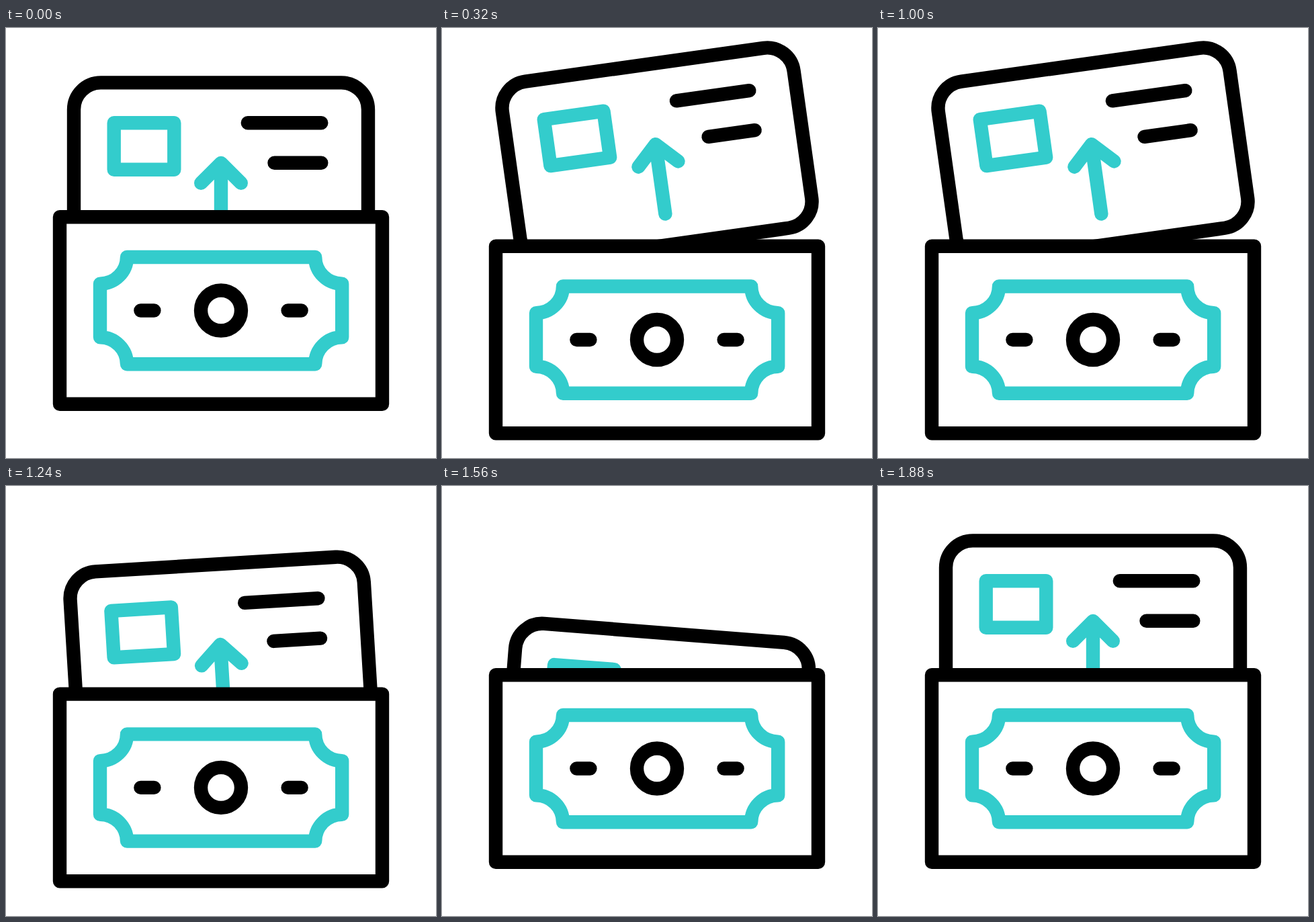
Write an HTML page that moves like this. It is 640x640 px and loops after 2000 ms.

```html
<!DOCTYPE html>
<html lang="en">
<head>
<meta charset="utf-8">
<title>Card and banknote</title>
<style>
  html, body { margin: 0; width: 100%; height: 100%; overflow: hidden; background: #fff; }
  svg { display: block; width: 100vw; height: 100vh; }
  g { fill: none; stroke: #000; stroke-width: 20.4; stroke-linecap: round; stroke-linejoin: round; }
  .teal { stroke: #33cccc; }
  .sweep { stroke-width: 22; }
  .solid { fill: #fff; }
</style>
</head>
<body>
<svg viewBox="0 0 640 640">
  <g id="card">
    <rect class="solid" x="101" y="81.4" width="438" height="270.6" rx="40"/>
    <rect class="teal" x="160.7" y="141.2" width="89.6" height="69.6"/>
    <path d="M359.8 141.2H469.3M399.5 200.8H469.3"/>
    <path id="sweep" class="teal sweep"/>
    <path id="arrow" class="teal"/>
  </g>
  <g id="wallet">
    <rect class="solid" x="80" y="281.2" width="480" height="278.6"/>
    <path id="bill" class="teal"/>
    <circle cx="320" cy="420.5" r="30"/>
    <path id="dashes"/>
  </g>
</svg>
<script>
const LOOP = 2000, STEP = 40;
const el = id => document.getElementById(id);
const [card, wallet, sweep, arrow, bill, dashes] =
  ['card', 'wallet', 'sweep', 'arrow', 'bill', 'dashes'].map(el);

// Eased keyframes: [time, value] pairs, held outside the range.
const TRACKS = {
  drop:   [[80, 0], [320, 43.5], [1082, 43.5], [1480, 0]],
  lift:   [[80, 0], [320, -28], [1082, -28], [1480, 153], [1880, 0]],
  tilt:   [[80, 0], [320, -8], [1082, -8], [1480, 5], [1880, 0]],
  pulse:  [[320, 0], [660, 1], [1000, 0]],
  head:   [[320, 0], [750, 1]],
  tail:   [[566, 0], [996, 1]]
};

function at(keys, t) {
  if (t <= keys[0][0]) return keys[0][1];
  for (let i = 1; i < keys.length; i++) {
    const [t0, a] = keys[i - 1], [t1, b] = keys[i];
    if (t < t1) {
      const u = (t - t0) / (t1 - t0);
      return a + (b - a) * u * u * (3 - 2 * u);
    }
  }
  return keys[keys.length - 1][1];
}

function sweepPath(from, to) {
  if (to - from <= 0.0001) return '';
  const line = (x, len, y) => `M${x + len * from} ${y}H${x + len * to}`;
  return line(359.8, 109.5, 141.2) + line(399.5, 69.8, 200.8);
}

function arrowPath(p) {
  const tip = 201 - 28 * p, wing = 230.7 - 18 * p, end = 305.5 - 21.8 * p;
  const w = 29.8 + 2 * p;
  return `M320 ${end}V${tip}M${320 - w} ${wing}L320 ${tip}L${320 + w} ${wing}`;
}

// Edges move inwards while the notch handles keep their length.
function billPath(p) {
  const k = 22, l = 140 + 9.2 * p, r = 500.2 - 9.2 * p;
  const t = 341 + 12 * p, b = 500.2 - 10 * p;
  const x0 = 180, x1 = 460.2, y0 = 380.7, y1 = 460.3;
  return `M${x0} ${t}H${x1}C${x1} ${t + k} ${r - k} ${y0} ${r} ${y0}` +
    `V${y1}C${r - k} ${y1} ${x1} ${b - k} ${x1} ${b}` +
    `H${x0}C${x0} ${b - k} ${l + k} ${y1} ${l} ${y1}` +
    `V${y0}C${l + k} ${y0} ${x0} ${t + k} ${x0} ${t}Z`;
}

function draw(t) {
  const v = {};
  for (const name in TRACKS) v[name] = at(TRACKS[name], t);
  const slide = 46.2 * v.pulse;
  card.setAttribute('transform', `translate(0 ${v.lift}) rotate(${v.tilt} 320 216.7)`);
  wallet.setAttribute('transform', `translate(0 ${v.drop})`);
  sweep.setAttribute('d', sweepPath(v.tail, v.head));
  arrow.setAttribute('d', arrowPath(v.pulse));
  bill.setAttribute('d', billPath(v.pulse));
  dashes.setAttribute('d', `M${200.4 + slide} 420.5h20M${439.6 - slide} 420.5h-20`);
}

const start = performance.now();
function tick() {
  const t = (performance.now() - start) % LOOP;
  draw(Math.floor(t / STEP) * STEP);
  requestAnimationFrame(tick);
}
tick();
</script>
</body>
</html>
```
